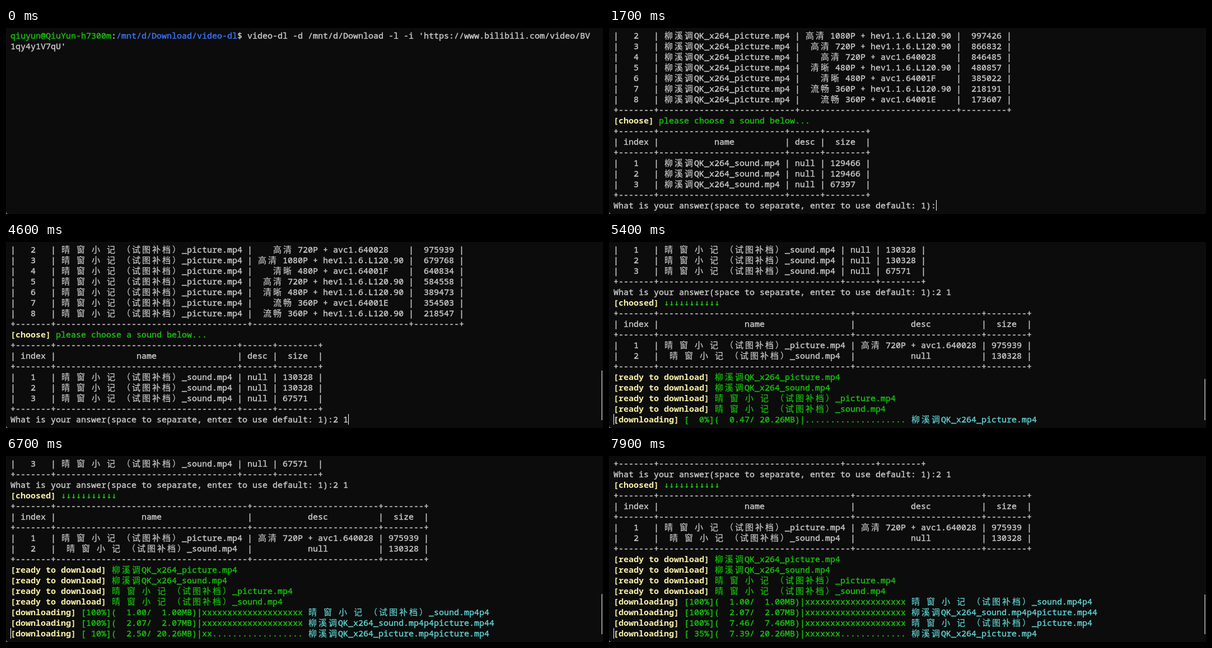
These frames come from a looping animation (1066 by 333 pixels, 8000 ms). An HTML page with a canvas:

```html
<!DOCTYPE html>
<html lang="zh-CN">
<head>
<meta charset="utf-8">
<title>video-dl</title>
<style>
html, body { margin: 0; width: 100%; height: 100%; overflow: hidden; background: #0c0c0c; }
canvas { display: block; }
</style>
</head>
<body>
<canvas id="term" width="1066" height="333"></canvas>
<script>
const ctx = document.getElementById('term').getContext('2d');
const LOOP = 8000, STEP = 100, ROWS = 17, CW = 9, LH = 19, X0 = 8, Y0 = 4;
const WHITE = '#cccccc', GREEN = '#16c60c', BLUE = '#3b78ff', YELLOW = '#f9f1a5', CYAN = '#61d6d6';
const MONO = '"Noto Sans Mono", "DejaVu Sans Mono", monospace';
const ARROWS = '"DejaVu Sans Mono", monospace';
const CJK = '"Noto Sans CJK SC", "Noto Sans CJK", sans-serif';

const URL_ = 'https://www.bilibili.com/video/BV1qy4y1V7qU';
const OPERA = '柳溪调QK_x264_', ESSAY = '晴 窗 小 记 （试图补档）_';
const PIC = 'picture.mp4', SND = 'sound.mp4';

// ---- text helpers ----
const isWide = c => c >= '\u2e80';
const width = s => [...s].reduce((n, c) => n + (isWide(c) ? 2 : 1), 0);
const plain = s => [[s, WHITE]];
const tag = (label, ...rest) => [[`[${label}] `, YELLOW, true], ...rest];
const note = (label, s) => tag(label, [s, GREEN]);

function center(s, w) {
  const gap = w - width(s);
  const left = width(s) % 2 ? gap >> 1 : (gap + 1) >> 1;
  return ' '.repeat(left) + s + ' '.repeat(gap - left);
}

function table(head, rows) {
  const all = [head, ...rows];
  const w = head.map((_, i) => Math.max(...all.map(r => width(r[i]))));
  const rule = '+' + w.map(n => '-'.repeat(n + 2)).join('+') + '+';
  const body = all.map(r => '| ' + r.map((s, i) => center(s, w[i])).join(' | ') + ' |');
  return [rule, body[0], rule, ...body.slice(1), rule].map(plain);
}

// ---- content ----
const HEAD = ['index', 'name', 'desc', 'size'];
const HEVC = 'hev1.1.6.L120.90';

const pictures = (name, list) => list.map(([q, codec, size], i) =>
  [`${i + 1}`, name + PIC, `${q} + ${codec}`, `${size}`]);
const sounds = (name, sizes) => sizes.map((size, i) =>
  [`${i + 1}`, name + SND, 'null', `${size}`]);

const first = {
  pics: pictures(OPERA, [
    ['高清 1080P', 'avc1.640032', 2124508], ['高清 1080P', HEVC, 997426],
    ['高清 720P', HEVC, 866832], ['高清 720P', 'avc1.640028', 846485],
    ['清晰 480P', HEVC, 480857], ['清晰 480P', 'avc1.64001F', 385022],
    ['流畅 360P', HEVC, 218191], ['流畅 360P', 'avc1.64001E', 173607]]),
  snds: sounds(OPERA, [129466, 129466, 67397]),
  picks: [0, 0],
  keys: [[3000, '1'], [3200, ' '], [3400, '1']]
};
const second = {
  pics: pictures(ESSAY, [
    ['高清 1080P', 'avc1.640032', 1893214], ['高清 720P', 'avc1.640028', 975939],
    ['高清 1080P', HEVC, 679768], ['清晰 480P', 'avc1.64001F', 640834],
    ['高清 720P', HEVC, 584558], ['清晰 480P', HEVC, 389473],
    ['流畅 360P', 'avc1.64001E', 354503], ['流畅 360P', HEVC, 218547]]),
  snds: sounds(ESSAY, [130328, 130328, 67571]),
  picks: [1, 0],
  keys: [[4200, '2'], [4500, ' '], [4600, '1']]
};

const typed = (keys, t) => keys.filter(k => k[0] <= t).map(k => k[1]).join('');

const choices = (v, t) => [
  note('choose', 'please choose a picture below...'),
  ...table(HEAD, v.pics),
  note('choose', 'please choose a sound below...'),
  ...table(HEAD, v.snds),
  plain('What is your answer(space to separate, enter to use default: 1):' + typed(v.keys, t))
];

const chosen = v => [
  note('choosed', '↓'.repeat(11)),
  ...table(HEAD, [v.pics[v.picks[0]], v.snds[v.picks[1]]].map((r, i) => [`${i + 1}`, ...r.slice(1)]))
];

// ---- downloads: four jobs share one status line ----
const jobs = {
  a: { name: ESSAY + SND, size: 1.00, done: s => 1.5 * s },
  b: { name: OPERA + SND, size: 2.07, done: s => 1.745 * s },
  c: { name: ESSAY + PIC, size: 7.46, done: s => 3 * s },
  d: { name: OPERA + PIC, size: 20.26, done: s => 1.562 * s + Math.max(0, s - 2.1) * 4.308 }
};
const WRITES = 'd b d a c c ad d c c b c dbc d c d c d d c d c d c cd d d d'.split(' ');

// A shorter name leaves the tail of the previous one behind.
function overwrite(old, text) {
  const w = width(text);
  let end = 0;
  return text + [...old].filter(c => (end += width(c)) > w).join('');
}

function downloads(t) {
  const out = [];
  let name = '', line = plain('');
  const count = Math.floor((t - 5200) / STEP) + 1;
  WRITES.slice(0, Math.max(0, count)).forEach((keys, i) => {
    for (const k of keys) {
      const job = jobs[k];
      const got = Math.min(job.size, job.done((i + 1) / 10));
      const ticks = Math.floor(got / job.size * 20);
      const mb = n => n.toFixed(2).padStart(6);
      name = overwrite(name, job.name);
      line = tag('downloading',
        [`[${String(ticks * 5).padStart(3)}%](${mb(got)}/${mb(job.size)}MB)|` +
          'x'.repeat(ticks) + '.'.repeat(20 - ticks) + ' ', GREEN],
        [name, CYAN]);
      if (got === job.size) {
        out.push(line);
        name = '';
        line = plain('');
      }
    }
  });
  return [...out, line];
}

// ---- terminal state at time t ----
function screen(t) {
  const log = [
    [0, [['qiuyun@QiuYun-h7300m', GREEN], [':', WHITE], ['/mnt/d/Download/video-dl', BLUE],
      ["$ video-dl -d /mnt/d/Download -l -i 'https://www.bilibili.com/video/BV", WHITE]],
      plain("1qy4y1V7qU'")],
    [1100, note('site', 'bilibili.com')],
    [1200, note('url', URL_)],
    [1400, note('list', 'tring to fetch more videos...')],
    [1500, note('list', 'fetched 1 more video(s)...'), note('url', URL_ + '?p=2')],
    [1600, ...choices(first, t)],
    [3700, ...chosen(first), ...choices(second, t)],
    [5000, ...chosen(second),
      ...'dbca'.split('').map(k => note('ready to download', jobs[k].name)), ...downloads(t)]
  ];
  const lines = log.filter(e => e[0] <= t).flatMap(e => e.slice(1));
  if (t >= 1000 && t < 1600) lines.push(plain(''));
  const last = lines[lines.length - 1].map(s => s[0]).join('');
  const cursor = t < 300 || t === 1600 ? -1 : t >= 5000 ? 0 : width(last);
  return { lines, cursor };
}

// ---- drawing ----
function drawRun(run, x, y, bold) {
  const wide = isWide(run[0]), arrow = run[0] === '↓';
  ctx.font = wide ? `15px ${CJK}`
    : arrow ? `bold 15px ${ARROWS}`
    : `${bold ? 'bold ' : ''}15px ${MONO}`;
  ctx.letterSpacing = wide ? '3px' : '0px';
  if (wide) x += 1;
  ctx.fillText(run, x, y);
  // a hairline outline gives the regular face a medium weight
  if (!bold && !arrow) ctx.strokeText(run, x, y);
}

function drawLine(line, row) {
  const y = Y0 + row * LH + 15;
  let x = X0;
  for (const [text, color, bold] of line) {
    ctx.fillStyle = ctx.strokeStyle = color;
    for (const run of text.match(/↓+|[\u2e80-\uffff]+|[^↓\u2e80-\uffff]+/g) || []) {
      ctx.lineWidth = isWide(run[0]) ? 0.2 : 0.4;
      drawRun(run, x, y, bold);
      x += width(run) * CW;
    }
  }
}

function draw(t) {
  const { lines, cursor } = screen(t);
  const view = lines.slice(-ROWS);
  ctx.fillStyle = '#0c0c0c';
  ctx.fillRect(0, 0, 1066, 333);
  view.forEach(drawLine);
  if (cursor >= 0) {
    ctx.fillStyle = '#ffffff';
    ctx.fillRect(X0 + cursor * CW, Y0 + (view.length - 1) * LH, 1, LH);
  }
  if (t >= 2000) {
    const h = Math.floor(307 * ROWS / lines.length);
    ctx.fillStyle = '#8a8a8a';
    ctx.fillRect(1063, 319 - h, 2, h);
  }
  // rounded window corner
  ctx.fillStyle = '#8c8c8c';
  ctx.beginPath();
  ctx.moveTo(0, 328);
  ctx.quadraticCurveTo(0, 333, 5, 333);
  ctx.lineTo(0, 333);
  ctx.fill();
}

ctx.lineJoin = 'round';
const start = performance.now();
let shown = -1;
function tick() {
  const t = Math.floor((performance.now() - start) % LOOP / STEP) * STEP;
  if (t !== shown) draw(shown = t);
  requestAnimationFrame(tick);
}
tick();
</script>
</body>
</html>
```
